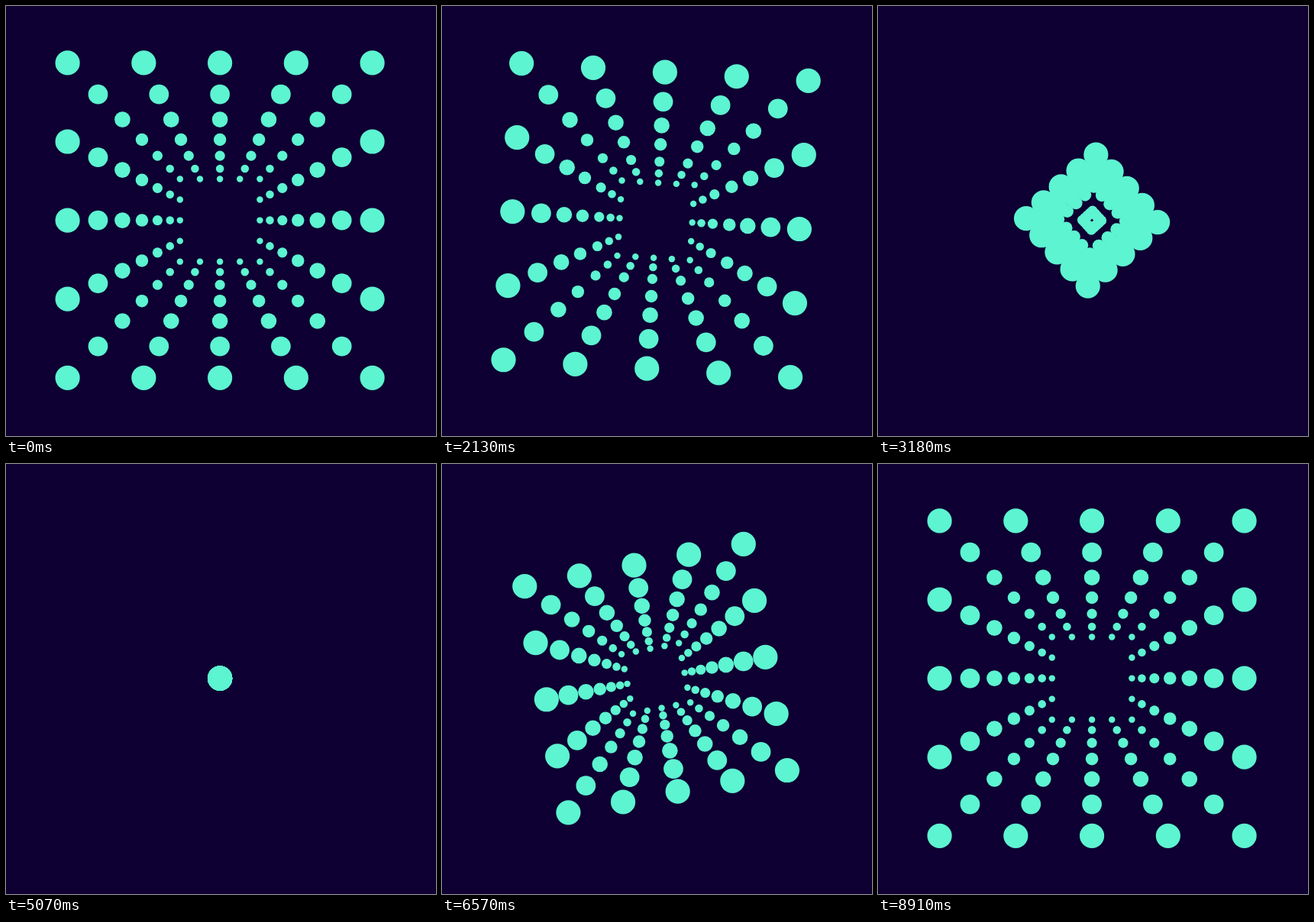
Animation, 563 px wide and 563 px high, one loop 8.94 s. Source, as an HTML page:

```html
<!DOCTYPE html>
<html lang="en">
<head>
<meta charset="utf-8">
<title>Dot grid</title>
<style>
html, body { margin: 0; width: 100%; height: 100%; overflow: hidden; background: #0e0032; }
svg { display: block; width: 100%; height: 100%; }
</style>
</head>
<body>
<svg id="stage" viewBox="0 0 563 563" fill="#5df4d1"></svg>
<script>
const LOOP = 8940, STEP = 30;
const CENTER = { x: 280.1, y: 280.6 };
const HALF = { w: 199.5, h: 206.2 };
const RINGS = 7, SHRINK = 0.8, DOT = 16.1;
const stage = document.getElementById('stage');

// Perimeter of a 5 x 5 grid, repeated in ever smaller rings
const dots = [];
for (let ring = 0; ring < RINGS; ring++) {
  const size = SHRINK ** ring;
  for (let i = -2; i <= 2; i++) {
    for (let j = -2; j <= 2; j++) {
      if (Math.max(Math.abs(i), Math.abs(j)) < 2) continue;
      const node = document.createElementNS('http://www.w3.org/2000/svg', 'circle');
      node.setAttribute('r', (DOT * size).toFixed(2));
      stage.append(node);
      dots.push({ node, ring, x: i / 2 * HALF.w * size, y: j / 2 * HALF.h * size });
    }
  }
}

function ease(time, start, duration) {
  const u = Math.min(1, Math.max(0, (time - start) / duration));
  return u * u * (3 - 2 * u);
}

function render(time) {
  const angle = (ease(time, 1820, 2620) + ease(time, 4520, 2620)) * Math.PI / 2;
  const cos = Math.cos(angle), sin = Math.sin(angle);
  const opened = ease(time, 5475, 1660);
  const outer = 1 - ease(time, 1820, 2136) + opened;
  const inner = 1 - ease(time, 1816, 1710) + opened;
  for (const { node, ring, x, y } of dots) {
    const scale = ring < 4 ? outer : inner;
    node.setAttribute('cx', (CENTER.x + scale * (x * cos - y * sin)).toFixed(2));
    node.setAttribute('cy', (CENTER.y + scale * (x * sin + y * cos)).toFixed(2));
  }
}

const origin = performance.now();
function tick() {
  const elapsed = (performance.now() - origin) % LOOP;
  render(Math.floor(elapsed / STEP) * STEP);
  requestAnimationFrame(tick);
}
render(0);
requestAnimationFrame(tick);
</script>
</body>
</html>
```
